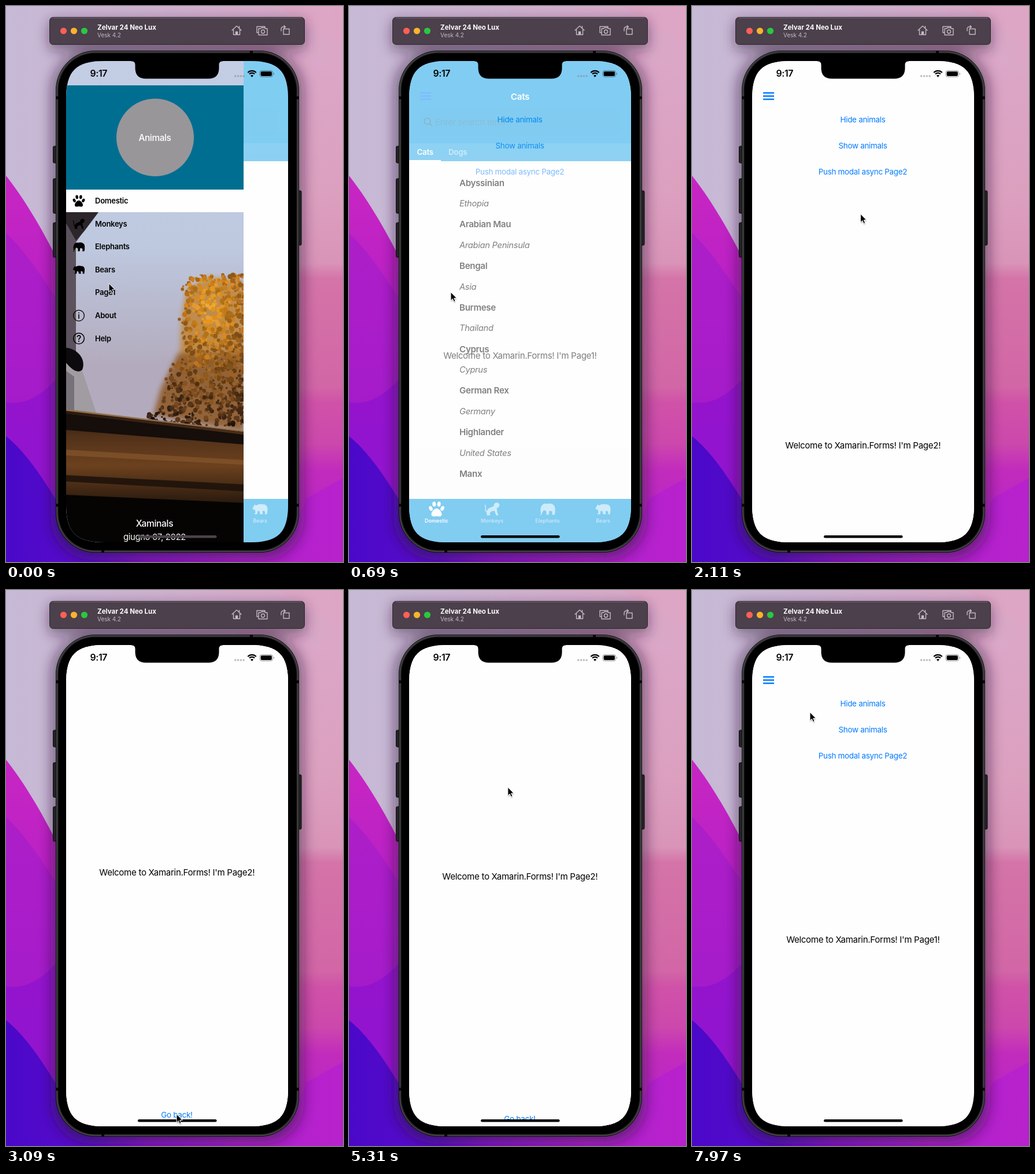
Write an HTML page that moves like this. It is 583x960 px and loops after 8000 ms.

```html
<!DOCTYPE html>
<html lang="en">
<head>
<meta charset="utf-8">
<title>Phone simulator</title>
<style>
  html, body { margin: 0; width: 100%; height: 100%; overflow: hidden; background: #c8bad4; }
  svg { display: block; width: 100vw; height: 100vh; }
  text { font-family: Inter, "Open Sans", sans-serif; letter-spacing: -0.02em; white-space: pre; }
</style>
</head>
<body>
<svg viewBox="0 0 583 960" xmlns="http://www.w3.org/2000/svg">
  <defs>
    <linearGradient id="base"><stop offset="0" stop-color="#c6bad6"/><stop offset=".45" stop-color="#cfb2d0"/><stop offset="1" stop-color="#dca6c6"/></linearGradient>
    <linearGradient id="right" x2="0" y2="1">
      <stop offset="0" stop-color="#dba7c8"/><stop offset=".28" stop-color="#dca0bf"/><stop offset=".42" stop-color="#d994b8"/>
      <stop offset=".45" stop-color="#d474a8"/><stop offset=".66" stop-color="#d266a6"/><stop offset=".69" stop-color="#d052a8"/><stop offset=".77" stop-color="#cc48ac"/><stop offset=".82" stop-color="#c22cbc"/><stop offset="1" stop-color="#b41fd0"/>
    </linearGradient>
    <linearGradient id="wave" x2="0" y2="1"><stop offset="0" stop-color="#c726c2"/><stop offset=".45" stop-color="#b41ec8"/><stop offset="1" stop-color="#8a12d2"/></linearGradient>
    <linearGradient id="floor"><stop offset="0" stop-color="#4a08c8"/><stop offset=".25" stop-color="#5a0bcc"/><stop offset=".42" stop-color="#8a14cf"/><stop offset=".7" stop-color="#b01fd0"/><stop offset="1" stop-color="#b822cc"/></linearGradient>
    <linearGradient id="sky" x2="0" y2="1"><stop offset="0" stop-color="#c3cde4"/><stop offset=".45" stop-color="#bec9e0"/><stop offset=".75" stop-color="#b3abbd"/></linearGradient>
    <linearGradient id="wood" x2="0" y2="1"><stop offset="0" stop-color="#24170f"/><stop offset=".3" stop-color="#53321a"/><stop offset=".6" stop-color="#6c411e"/><stop offset="1" stop-color="#2a1a0e"/></linearGradient>
    <filter id="soft" x="-20%" y="-20%" width="140%" height="140%"><feGaussianBlur stdDeviation="11"/></filter>
    <filter id="blur1" x="-50%" y="-50%" width="200%" height="200%"><feGaussianBlur stdDeviation="1.2"/></filter>
    <filter id="haze" x="-20%" y="-20%" width="140%" height="140%"><feGaussianBlur stdDeviation="5"/></filter>
    <clipPath id="screen"><path d="M104 161C104 112 121 95 170 95H422C471 95 488 112 488 161V860C488 909 471 926 422 926H170C121 926 104 909 104 860Z"/></clipPath>
    <clipPath id="photo"><path d="M104 95H411V926H104Z"/></clipPath>
  </defs>

  <g id="wallpaper">
    <path fill="url(#base)" d="M0 0H583V960H0Z"/>
    <path fill="#e0a5c4" opacity=".6" d="M470 0C505 15 540 50 583 62V0Z"/>
    <path fill="url(#right)" d="M500 70C530 90 560 120 583 128V960H400V70Z"/>
    <path fill="url(#wave)" d="M0 293C28 328 60 380 90 440V960H0Z"/>
    <path fill="#a41ccb" opacity=".65" d="M0 392C40 430 62 470 90 508V960H0Z"/>
    <path fill="#8d12d0" opacity=".7" d="M0 684C35 690 65 670 90 640V960H0Z"/>
    <path fill="url(#floor)" d="M0 743C30 766 60 809 88 855L130 900H500L520 850L583 815V960H0Z"/>
  </g>

  <g filter="url(#soft)" fill="#2b1238">
    <rect x="78" y="76" width="437" height="880" rx="70" opacity=".5"/>
    <rect x="73" y="24" width="446" height="54" rx="10" opacity=".45"/>
  </g>

  <g id="bar">
    <rect x="75.5" y="19.5" width="441" height="47" rx="6" fill="#4b404b" stroke="#2f2730"/>
    <path d="M81 20.5H511" stroke="#776c77"/>
    <circle cx="99.5" cy="43" r="5.6" fill="#ff5f57"/><circle cx="117.5" cy="43" r="5.6" fill="#f9b42e"/><circle cx="135.5" cy="43" r="5.6" fill="#2ac840"/>
    <g fill="none" stroke="#c3b9c2" stroke-width="1.4" stroke-linejoin="round" stroke-linecap="round">
      <path d="M391 42L399 34.5L407 42M393.5 41V49.5H404.5V41M403.5 35V38"/><path d="M397.5 49V44.5H400.5V49" fill="#c3b9c2"/>
      <path d="M436.5 46H434V35.5H448V37.5M437 39H440.5L442 37.5H447L448.5 39H452V50H437Z"/><circle cx="444.5" cy="44.3" r="3"/>
      <path d="M480 39.5H490V49H480ZM476 43V40Q476 36 480 36H483M481 33.8L483.5 36L481 38.2"/>
    </g>
  </g>

  <g id="body">
    <g fill="#232225" stroke="#0d0d0e">
      <rect x="81.5" y="242" width="7" height="29" rx="2"/><rect x="81.5" y="298" width="7" height="60" rx="2"/><rect x="81.5" y="374" width="7" height="60" rx="2"/><rect x="504" y="319" width="7" height="94" rx="2"/>
    </g>
    <rect x="86.5" y="77.5" width="420" height="866" rx="68" fill="#29282a" stroke="#111"/>
    <rect x="88" y="79" width="417" height="863" rx="66.5" fill="none" stroke="#5a595c"/>
    <path d="M86 158.5H92M86 862H92M501 158.5H507M501 862H507M424.5 77V82M167.5 939V944" stroke="#080808" stroke-width="5"/>
    <rect x="90.5" y="81.5" width="412" height="858" rx="64" fill="#000"/>
  </g>

  <g clip-path="url(#screen)">
    <path fill="#fefefe" d="M104 95H488V926H104Z"/>
    <g id="cats"></g>
    <g id="page1"></g>
    <g id="page2"></g>
    <g id="flyout" clip-path="url(#photo)"></g>
    <g id="status"></g>
  </g>
  <path d="M217 94H375V95.5C370 95.5 368.5 98 368.5 102V107Q368.5 125.500 350 125.500H242Q223.500 125.500 223.500 107V102C223.500 98 222 95.500 217 95.500Z"/>

  <g id="cursor">
    <path d="M0 1V15L3.3 12L5.5 17L7.8 16L5.7 11H10.2Z" opacity=".35" filter="url(#blur1)" transform="translate(.5 1.5)"/>
    <path d="M0 0V14.6L3.3 11.5L5.5 16.6L8 15.5L5.8 10.5H10.3Z" stroke="#fff" stroke-width="1"/>
  </g>
</svg>

<script>
const $ = id => document.getElementById(id);
const BLUE = '#007aff', BRAND = '#039be6', LOOP = 8000;
const text = (x, y, s, size, attrs = '') => `<text x="${x}" y="${y}" font-size="${size}" ${attrs}>${s}</text>`;
const mid = 'text-anchor="middle" ';
const rect = (x, y, w, h, fill, attrs = '') => `<rect x="${x}" y="${y}" width="${w}" height="${h}" fill="${fill}" ${attrs}/>`;
const shape = (fill, d, attrs = '') => `<path fill="${fill}" d="${d}" ${attrs}/>`;
const at = (x, y, k, s, attrs = '') => `<g transform="translate(${x} ${y}) scale(${k})" ${attrs}>${s}</g>`;
const bars = color => [148.8, 154.3, 159.8].map(y => rect(123, y, 19, 2.5, color)).join('');

const toe = (x, y, r) => `<ellipse cx="${x}" cy="${y}" rx="3" ry="4.3" transform="rotate(${r} ${x} ${y})"/>`;
const icons = {
  Domestic: '<path d="M0 -1C4 -1 9 5 9 9C9 14 4 13 0 12.3C-4 13 -9 14 -9 9C-9 5 -4 -1 0 -1Z"/>' +
    toe(-10, -1, -25) + toe(-4.2, -8.5, -8) + toe(4.2, -8.5, 8) + toe(10, -1, 25),
  Monkeys: '<path d="M-9 11C-10 5 -9 0 -4 -2L3 -5C3 -9 5 -11 8 -11C12 -11 13 -8 13 -6L11 -3L8 -1L9 5L11 11H7L4 3L-1 4L-4 7L-3 11Z"/>' +
    '<path d="M-8 5C-15 4 -8 -5 -13 -7" fill="none" stroke="currentColor" stroke-width="1.6"/>',
  Elephants: '<path d="M-13 10L-11 9C-12 5 -13 0 -11 -4C-9 -9 -5 -10 -1 -9C6 -11 13 -8 13 -1V6L12 10H8V4L3 3L2 10H-2V4L-6 2C-8 3 -9 5 -10 9C-11 11 -13 11 -13 10Z"/>',
  Bears: '<path d="M-13 -1L-11 -5L-9 -8L-7 -6C-3 -9 2 -9 6 -8C11 -8 13 -4 13 1L12 9H8L9 6L7 3L4 4L5 9H0L-1 4L-4 3L-5 9H-10L-8 6L-9 1L-12 1Z"/>',
  About: '<circle r="12" fill="none" stroke="currentColor" stroke-width="1.7"/><path d="M0 -3V7M0 -7V-5" stroke="currentColor" stroke-width="2"/>',
  Help: '<circle r="12" fill="none" stroke="currentColor" stroke-width="2"/><path d="M-3.5 -3C-3.5 -8 4 -7.5 3.5 -3C3 -1 0 -1 0 3M0 5V7.5" fill="none" stroke="currentColor" stroke-width="2.2"/>'
};

function buildCats() {
  const breeds = [['Abyssinian', 'Ethopia'], ['Arabian Mau', 'Arabian Peninsula'], ['Bengal', 'Asia'], ['Burmese', 'Thailand'],
    ['Cyprus', 'Cyprus'], ['German Rex', 'Germany'], ['Highlander', 'United States'], ['Manx', '']];
  const list = breeds.map(([name, place], i) => {
    const y = 310.7 + i * 71.75;
    return text(191, y, name, 15.1, 'font-weight="600"') + text(191, y + 35.5, place, 14.7, 'font-style="italic"');
  }).join('');
  const tabs = ['Domestic', 'Monkeys', 'Elephants', 'Bears'].map((name, i) =>
    `<g transform="translate(${151.5 + i * 96} 0)" fill="#fff" color="#fff" opacity="${i ? .62 : 1}">` +
    at(0, 868.5, 1, icons[name]) + text(0, 892, name, 9, mid + `font-weight="${i ? 500 : 600}" style="letter-spacing:0"`) + '</g>').join('');
  const search = '<g opacity=".42" stroke="#222" stroke-width="1.5" fill="none"><circle cx="135.5" cy="199" r="5.3"/><path d="M139.5 203L144 207.5"/></g>';
  $('cats').innerHTML = rect(104, 95, 384, 173, BRAND) + rect(104, 237, 384, 31, '#1ba4e9') + bars('#fff') +
    rect(122, 178, 348, 45, '#3c3c43', 'rx="9" opacity=".012"') +
    text(296, 162, 'Cats', 15.2, mid + 'font-weight="600" fill="#fff"') + search +
    text(149, 206, 'Enter search term', 15, 'fill="#3c3c43" opacity=".3"') +
    text(117.5, 257, 'Cats', 13.3, 'font-weight="600" fill="#fff"') + text(172, 257, 'Dogs', 13.3, 'font-weight="600" fill="#fff" opacity=".6"') +
    rect(104, 266, 55, 2, '#fff') + list + rect(104, 851, 384, 75, BRAND) + tabs;
}

function buildPages() {
  const welcome = (y, n) => text(295.8, y, `Welcome to Xamarin.Forms! I'm Page${n}!`, 15.1, mid);
  const button = (y, s, id) => text(295.5, y, s, 13.4, mid + `fill="${BLUE}" id="${id}"`);
  const sheet = rect(104, 95, 384, 831, '#fefefe');
  $('page1').innerHTML = sheet + bars(BLUE) + button(201.3, 'Hide animals', 'hide') + button(246, 'Show animals', 'show') +
    button(291, 'Push modal async Page2', 'push') + welcome(608.5, 1);
  $('page2').innerHTML = sheet + welcome(493, 2) + button(911, 'Go back!', 'back');
}

// autumn tree: fine leaves, brighter at the crown, sparse at the edge
function tree() {
  let seed = 7, leaves = '';
  const rnd = () => (seed = seed * 16807 % 2147483647) / 2147483647;
  for (let i = 0; i < 1100; i++) {
    const v = rnd(), y = 464 + v * 262;
    const left = 304 - Math.max(0, y - 590) * .45 + Math.max(0, 490 - y) * .8 + Math.sin(y / 13) * 6;
    const x = left + Math.pow(rnd(), .85) * (416 - left);
    const glow = 1 - Math.hypot((x - 355) / 90, (y - 520) / 150);
    const light = 33 + 20 * glow - 7 * v + (rnd() - .5) * 20;
    leaves += `<circle cx="${x.toFixed(1)}" cy="${y.toFixed(1)}" r="${(1.2 + rnd() * 3.4).toFixed(1)}" fill="hsl(${30 + 8 * glow | 0} ${62 + 22 * glow | 0}% ${light | 0}%)"/>`;
  }
  return shape('#c2822f', 'M312 490L350 468L411 476V620H300L304 540Z', 'filter="url(#haze)" opacity=".8"') +
    shape('#8f5c2b', 'M298 600H411V735L255 706L268 660Z', 'filter="url(#haze)" opacity=".9"') + leaves;
}

function buildFlyout() {
  const photo = rect(104, 95, 307, 831, '#050403') + rect(104, 95, 307, 700, 'url(#sky)') +
    shape('#5c525d', 'M104 356H158L121 408V598H104Z') + shape('#2c262b', 'M104 356H160L136 388L121 405L104 375Z') +
    shape('#a09ca1', 'M104 615L132 630L156 702H104Z') + shape('#77727a', 'M104 630L118 640V702H104Z') +
    shape('#0c0a0c', 'M104 590C124 592 139 610 132 628C124 636 112 626 104 616Z') + tree() +
    shape('url(#wood)', 'M104 697L411 735V858L104 844Z') + shape('#150e0a', 'M104 704L411 740V757L104 732Z') +
    shape('#8b5a2d', 'M104 766L411 784V792L104 776Z', 'opacity=".6"') + shape('#1c110a', 'M104 810L411 826V838L104 821Z', 'opacity=".85"') +
    shape('#95704c', 'M104 696L411 733V735L104 699Z');
  const rows = ['Domestic', 'Monkeys', 'Elephants', 'Bears', 'Page1', 'About', 'Help'].map((name, i) => {
    const y = 336.5 + i * 39.6;
    return (icons[name] ? at(126, y, .78, icons[name], 'color="#000"') : '') + text(154, y + 4.5, name, 13, 'font-weight="600"');
  }).join('');
  $('flyout').innerHTML = photo + rect(104, 137, 307, 180, '#006e91') + '<circle cx="258" cy="227" r="67" fill="#989699"/>' +
    text(257.5, 232.5, 'Animals', 15.3, mid + 'fill="#fff" font-weight="500"') + rect(104, 317, 307, 39, '#fefefe') + rows +
    text(257, 899, 'Xaminals', 15.5, mid + 'fill="#fff" font-weight="500"') + text(257, 922, 'giugno 07, 2022', 14.8, mid + 'fill="#fff"');
}

function buildStatus() {
  const dots = [0, 1, 2, 3].map(i => `<circle cx="${396.7 + i * 4.8}" cy="121" r="1.8" fill="#888" opacity=".55"/>`).join('');
  const arc = (r, w) => `<path d="M${425.5 - r * .72} ${122 - r * .7}A${r} ${r} 0 0 1 ${425.5 + r * .72} ${122 - r * .7}" fill="none" stroke="#000" stroke-width="${w}"/>`;
  $('status').innerHTML = text(145.5, 122.3, '9:17', 15.8, 'font-weight="600"') + dots + arc(10, 2.3) + arc(6.3, 2.2) +
    '<path d="M425.5 123L423 120A4 4 0 0 1 428 120Z"/>' +
    '<rect x="439" y="111.5" width="22.5" height="11" rx="3.5" fill="none" stroke="#000" opacity=".4"/><rect x="440.6" y="113" width="19.3" height="8" rx="2"/><path d="M463 115Q465 117 463 119Z" opacity=".5"/>' +
    rect(228, 914, 136.5, 4.5, '#000', 'rx="2.25" id="home"');
}

buildCats(); buildPages(); buildFlyout(); buildStatus();
$('bar').insertAdjacentHTML('beforeend', text(158, 41.2, 'Zelvar 24 Neo Lux', 11.5, 'font-weight="700" fill="#fff" style="letter-spacing:0"') +
  text(158, 54, 'Vesk 4.2', 10, 'fill="#c3b9c2" style="letter-spacing:0"'));

const clamp = v => Math.max(0, Math.min(1, v));
const span = (t, a, b) => clamp((t - a) / (b - a));
const smooth = u => u * u * (3 - 2 * u);
const spring = ms => ms <= 0 ? 0 : 1 - (1 + ms * .011) * Math.exp(-ms * .011);
const press = (t, down, up) => t < down ? 1 : t < up ? .2 : .2 + .8 * span(t, up, up + 250);

// pointer stops: time, x, y
const path = [[0, 178, 479], [50, 178, 479], [170, 176, 494], [1020, 176, 494], [1110, 187, 466], [1220, 214, 414], [1340, 248, 344], [1480, 273, 296], [1640, 281, 283],
  [2000, 281, 283], [2200, 300, 420], [2420, 322, 690], [2630, 326, 835], [2850, 312, 885], [3090, 295, 905],
  [3560, 295, 905], [3740, 291, 760], [3950, 288, 430], [4140, 285, 311], [4300, 281, 289], [4440, 280, 283],
  [5150, 280, 283], [5430, 271, 383], [5800, 288, 560], [6100, 303, 730], [6270, 308, 791], [6440, 300, 840], [6700, 296, 905],
  [7050, 296, 905], [7250, 280, 740], [7550, 225, 370], [7760, 200, 240], [7910, 197, 216], [7970, 204, 211], [LOOP, 204, 211]];

function pointer(t) {
  const i = Math.max(1, path.findIndex(p => p[0] > t));
  const [a, b] = [path[i - 1], path[i]], u = span(t, a[0], b[0]);
  return [a[1] + (b[1] - a[1]) * u, a[2] + (b[2] - a[2]) * u];
}

function draw(t) {
  const closed = 1 - (1 - span(t, 320, 590)) ** 2;
  $('flyout').setAttribute('transform', `translate(${-307 * closed} 0)`);
  $('flyout').style.display = closed < 1 ? '' : 'none';
  $('home').setAttribute('fill', closed < .5 ? '#4b434b' : '#000');

  const fade = smooth(span(t, 510, 870));
  $('cats').setAttribute('opacity', fade < 1 ? .5 + .5 * closed : 0);
  $('page1').setAttribute('opacity', fade);

  const shown = spring(t - 1900) - spring(t - 3410) + spring(t - 4690) - spring(t - 7000);
  $('page2').setAttribute('transform', `translate(0 ${831 * (1 - shown)})`);
  $('push').setAttribute('opacity', press(t, 1690, 1870) * press(t, 4490, 4660));
  $('back').setAttribute('opacity', press(t, 3200, 3380) * press(t, 6780, 6960));

  $('cursor').setAttribute('transform', `translate(${pointer(t).join(' ')})`);
}

function tick() {
  draw(performance.now() % LOOP);
  requestAnimationFrame(tick);
}
tick();
</script>
</body>
</html>
```
